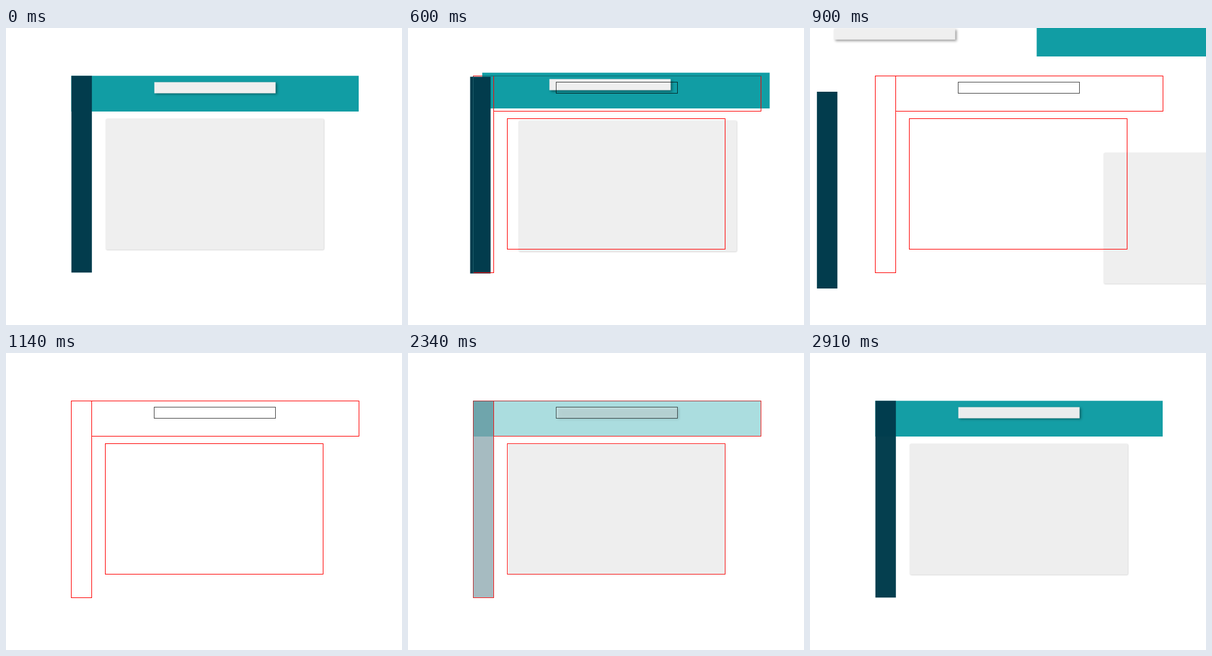
An HTML page with a canvas that plays this animation: 640x480 px, repeating every 4350 ms.

```html
<!DOCTYPE html>
<html lang="en">
<head>
<meta charset="utf-8">
<title>Layout blocks</title>
<style>
  html, body { margin: 0; width: 100%; height: 100%; overflow: hidden; background: #fff; }
  canvas { display: block; width: 640px; height: 480px; }
</style>
</head>
<body>
<canvas id="stage" width="640" height="480"></canvas>
<script>
const ctx = document.getElementById('stage').getContext('2d');
const LOOP = 4350, STEP = 30;
const RED = '#f00';

// dx, dy: full travel when the block leaves the stage
const header = { x: 105.5, y: 77.3, w: 464.5, h: 57.7, dx: 403, dy: -137.5, fill: '#119da4' };
const sidebar = { x: 105.7, y: 77.2, w: 33.1, h: 318, dx: -146, dy: 40, fill: '#023c4d' };
const slab = { x: 239.7, y: 87.4, w: 196, h: 18, dx: -310.5, dy: -134, fill: '#efefef',
  shadow: [2, 2, 4, 0.4] };
const panel = { x: 161.3, y: 146.8, w: 352.4, h: 211.4, dx: 484, dy: 85, fill: '#efefef', radius: 2,
  shadow: [0.5, 0.5, 2, 0.22] };
const blocks = [header, sidebar, slab, panel];

const clamp = v => Math.min(1, Math.max(0, v));
const inOutCubic = p => p < 0.5 ? 4 * p ** 3 : 1 - (2 - 2 * p) ** 3 / 2;
const outCubic = p => 1 - (1 - p) ** 3;

function drawBlock(b, k, alpha) {
  ctx.save();
  ctx.globalAlpha = alpha;
  ctx.translate(b.dx * k, b.dy * k);
  if (b.shadow) {
    const [sx, sy, blur, dark] = b.shadow;
    ctx.shadowOffsetX = sx;
    ctx.shadowOffsetY = sy;
    ctx.shadowBlur = blur;
    ctx.shadowColor = `rgba(0,0,0,${dark})`;
  }
  ctx.fillStyle = b.fill;
  ctx.beginPath();
  ctx.roundRect(b.x, b.y, b.w, b.h, b.radius || 0);
  ctx.fill();
  ctx.restore();
}

function hLine(x1, x2, y, color) {
  ctx.fillStyle = color;
  ctx.fillRect(x1, y, x2 - x1 + 1, 1);
}

function vLine(x, y1, y2, color) {
  ctx.fillStyle = color;
  ctx.fillRect(x, y1, 1, y2 - y1 + 1);
}

function frame(x1, y1, x2, y2, color) {
  hLine(x1, x2, y1, color);
  hLine(x1, x2, y2, color);
  vLine(x1, y1 + 1, y2 - 1, color);
  vLine(x2, y1 + 1, y2 - 1, color);
}

function drawOutlines(alpha) {
  ctx.globalAlpha = alpha;
  frame(105, 77, 138, 395, RED);
  hLine(139, 570, 77, RED);
  hLine(139, 570, 134, RED);
  vLine(570, 78, 133, RED);
  frame(160, 146, 512, 357, RED);
  frame(239, 87, 435, 105, 'rgba(0,0,0,0.72)');
  ctx.globalAlpha = 1;
}

// Outline edges take a muted tone where a coloured block lies over them
function within(b, k, alpha, paint) {
  ctx.save();
  ctx.beginPath();
  ctx.rect(Math.floor(b.x + b.dx * k), Math.floor(b.y + b.dy * k), b.w + 0.5, b.h + 0.5);
  ctx.clip();
  ctx.globalAlpha = alpha;
  paint();
  ctx.restore();
}

function muteEdges(k, alpha) {
  within(header, k, alpha, () => hLine(105, 570, 77, '#0c6a70'));
  within(sidebar, k, alpha, () => vLine(105, 77, 395, '#1c5a68'));
}

function render(t) {
  ctx.clearRect(0, 0, 640, 480);
  let k = 0, solid = 1, lines = 0;
  if (t < 1140) {
    k = t < 480 ? 0 : inOutCubic(clamp((t - 420) / 865));
    lines = t < 60 ? 0 : clamp((t - 30) / 150);
  } else if (t < 2250) {
    solid = 0;
    lines = 1;
  } else {
    solid = outCubic((Math.min(t, 2910) - 2218) / 919);
    lines = 1 - clamp((t - 2218) / 540) ** 1.5;
  }
  if (solid) blocks.forEach(b => drawBlock(b, k, solid));
  if (lines) {
    drawOutlines(lines);
    if (solid) muteEdges(k, solid * lines);
  }
}

const start = performance.now();
function tick() {
  const t = (performance.now() - start) % LOOP;
  render(Math.floor(t / STEP) * STEP);
  requestAnimationFrame(tick);
}
tick();
</script>
</body>
</html>
```
